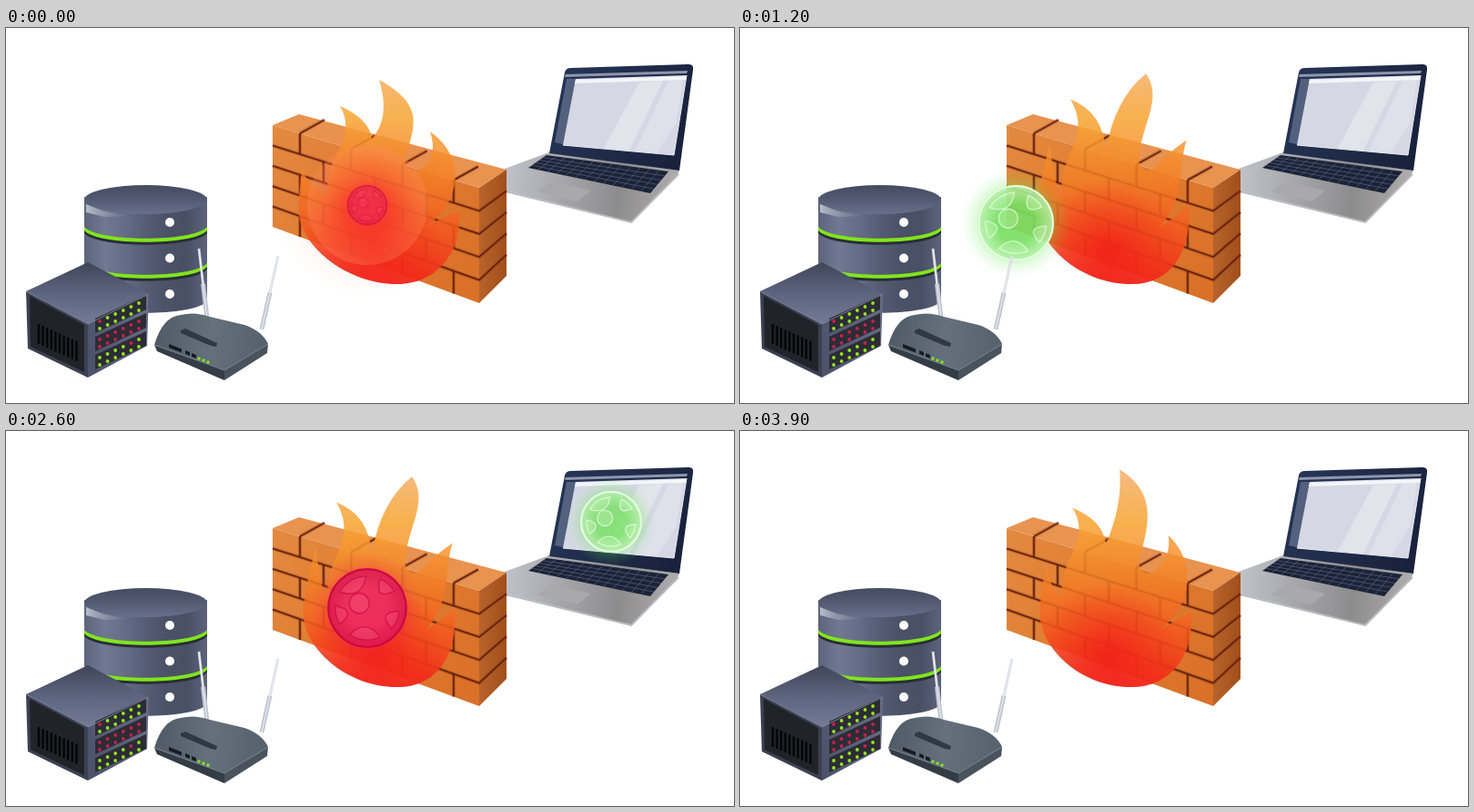
Animation of 800x413 px, one loop 4 s. Source, as an HTML page with a canvas:

```html
<!DOCTYPE html>
<html lang="en">
<head>
<meta charset="utf-8">
<title>Firewall</title>
<style>
html, body { margin: 0; width: 100%; height: 100%; overflow: hidden; background: #fff; }
canvas { display: block; width: 800px; height: 413px; }
</style>
</head>
<body>
<canvas id="stage" width="800" height="413"></canvas>
<script>
const ctx = document.getElementById('stage').getContext('2d');
const LOOP = 4000, STEP = 100, TAU = Math.PI * 2;
const mix = (a, b, k) => a + (b - a) * k;
const ramp = (t, from, to) => Math.max(0, Math.min(1, (t - from) / (to - from)));

function poly(fill, ...pts) {
  ctx.beginPath();
  for (let i = 0; i < pts.length; i += 2) ctx.lineTo(pts[i], pts[i + 1]);
  ctx.closePath();
  ctx.fillStyle = fill;
  ctx.fill();
}
function line(color, width, ...pts) {
  ctx.beginPath();
  for (let i = 0; i < pts.length; i += 2) ctx.lineTo(pts[i], pts[i + 1]);
  ctx.strokeStyle = color;
  ctx.lineWidth = width;
  ctx.stroke();
}
function disc(fill, x, y, r) {
  ctx.beginPath();
  ctx.arc(x, y, r, 0, TAU);
  ctx.fillStyle = fill;
  ctx.fill();
}
function withStops(gradient, colors) {
  colors.forEach((c, i) => gradient.addColorStop(i / (colors.length - 1), c));
  return gradient;
}
const linear = (x0, y0, x1, y1, ...colors) => withStops(ctx.createLinearGradient(x0, y0, x1, y1), colors);
const radial = (x, y, r0, r1, ...colors) => withStops(ctx.createRadialGradient(x, y, r0, x, y, r1), colors);

function seeded(seed) {
  return () => (seed = (seed * 16807) % 2147483647) / 2147483647;
}

function drawLaptop() {
  poly(linear(550, 165, 735, 185, '#c0c1c7', '#a6a6aa', '#8d8c8d', '#aeacad'),
    597, 137, 740, 157, 737, 163, 688, 214, 545, 178, 545, 156);
  line('#b9bac0', 2, 545, 179, 687, 214, 739, 161);
  poly('#a9a8ad', 600, 169, 643, 179, 628, 191, 584, 180);

  // Keyboard: a dark sheet split by a perspective grid.
  const key = (u, v) => [mix(594, 728, u) - 20 * v, mix(140, 158, u) + mix(14, 24, u) * v];
  poly('#1b2338', ...key(0, 0), ...key(1, 0), ...key(1, 1), ...key(0, 1));
  for (let i = 1; i < 5; i++) line('#59617a', .7, ...key(0, i / 5), ...key(1, i / 5));
  for (let i = 1; i < 13; i++) line('#59617a', .7, ...key(i / 13, 0), ...key(i / 13, 1));

  ctx.beginPath();
  ctx.moveTo(597, 138);
  ctx.lineTo(614, 49);
  ctx.quadraticCurveTo(615, 44, 621, 44);
  ctx.lineTo(749, 40);
  ctx.quadraticCurveTo(756, 39, 755, 46);
  ctx.lineTo(740, 157);
  ctx.closePath();
  ctx.fillStyle = linear(600, 60, 750, 140, '#263557', '#18213a');
  ctx.fill();
  poly('#8e97af', 615, 51, 749, 47, 748, 50, 614, 54);
  poly('#53617f', 616, 56, 627, 56, 616, 129, 603, 126);
  poly('#d5d8e4', 626, 56, 748, 52, 734, 140, 612, 129);
  poly('#f4f5f9', 626, 57, 748, 53, 747, 57, 625, 61);
  poly('rgba(255,255,255,.3)', 696, 60, 722, 58, 685, 135, 657, 132);
  poly('rgba(255,255,255,.2)', 728, 58, 744, 57, 737, 104, 715, 138, 691, 136);
  line('#e8ebf2', 1, 612, 129, 734, 140, 748, 52);
}

function drawWall() {
  const rows = 5, pitch = 56.3;
  const frontY = (x, k) => mix(mix(107, 176, (x - 293) / 227), mix(219, 303, (x - 293) / 227), k);
  poly(linear(293, 110, 520, 300, '#e38a40', '#df7b31', '#d97027'), 293, 107, 520, 176, 520, 303, 293, 219);
  poly('#e89350', 293, 107, 322, 95, 550, 156, 520, 176);
  poly(linear(520, 230, 550, 230, '#b8632a', '#a04f1b'), 520, 176, 550, 156, 550, 273, 520, 303);
  for (const [width, color] of [[4, 'rgba(143,57,20,.4)'], [1.6, '#61210f']]) {
    for (let row = 0; row < rows; row++) {
      const top = row / rows, bottom = (row + 1) / rows;
      if (row) line(color, width, 293, frontY(293, top), 520, frontY(520, top), 550, mix(156, 273, top));
      for (let x = row % 2 ? 349 : 323; x < 510; x += pitch) {
        line(color, width, x, frontY(x, top), x, frontY(x, bottom));
        if (!row) line(color, width, x, frontY(x, 0), x + 27, frontY(x, 0) - 15);
      }
    }
  }
}

function drawFlame(t) {
  const phase = t / 700 * TAU;
  const sin = Math.sin(phase), cos = Math.cos(phase), sway = sin * sin;
  const left = 326 - 4 * cos, bottom = 282;
  const low = { x: 331 - 5 * cos + 9 * sway, y: 153 - 26 * sway };
  const side = { x: 367 + 4 * sin, y: 86 - 8 * sway };
  const main = { x: 410 + 38 * sway, y: 50 + 7 * (cos + sin) + 9 * sway };
  const right = { x: 466 + 26 * sway, y: 114 + 14 * sway + 4 * sin };
  const ear = { x: 498 + 5 * sin, y: 202 + 6 * sin };

  ctx.beginPath();
  ctx.moveTo(left, 206);
  ctx.quadraticCurveTo(left - 1, 180, low.x, low.y);
  ctx.quadraticCurveTo(low.x + 5, 179, 354, 184);
  ctx.bezierCurveTo(349, 140, 388, 122, side.x, side.y);
  ctx.quadraticCurveTo(399, side.y + 14, 402, 122 + 14 * sway);
  ctx.quadraticCurveTo(423 - 12 * sway, main.y + 42 - 15 * sway, main.x, main.y);
  ctx.bezierCurveTo(main.x + 50 - 32 * sway, main.y + 28, 450 - 10 * sway, 106, 438, 146);
  ctx.quadraticCurveTo(442, 161, 453, 156);
  ctx.quadraticCurveTo(476 - 10 * sway, right.y + 30 - 14 * sway, right.x, right.y);
  ctx.bezierCurveTo(505 - 25 * sway, right.y + 28, 503 - 14 * sway, 188, 461, 220);
  ctx.quadraticCurveTo(476, 209, ear.x, ear.y);
  ctx.bezierCurveTo(ear.x + 4, 246, 474, bottom, 430, bottom);
  ctx.bezierCurveTo(376, bottom, left + 4, 242, left, 206);
  ctx.fillStyle = linear(0, 40, 0, 283, 'rgba(245,184,125,.95)', 'rgba(247,166,54,.88)',
    'rgba(244,130,38,.8)', 'rgba(243,88,30,.84)', 'rgba(240,40,26,.94)');
  ctx.fill();
  ctx.save();
  ctx.clip();
  disc(radial(405, 247, 0, 80, 'rgba(242,22,24,.75)', 'rgba(245,25,20,0)'), 405, 247, 80);
  ctx.restore();
}

const GREEN = { body: '122,222,100', rim: '190,243,178', edge: '235,255,230', glow: '95,235,75', patch: '218,255,208' };
const RED = { body: '236,44,98', rim: '216,22,80', edge: '205,5,66', glow: '246,32,82', patch: '255,120,155' };

function drawOrb(x, y, r, tone, alpha, density) {
  if (r < 1 || alpha <= 0) return;
  const rgba = (part, a) => `rgba(${tone[part]},${a})`;
  ctx.save();
  ctx.globalAlpha = alpha;
  disc(radial(x, y, r * .82, r * 1.42, rgba('glow', .42), rgba('glow', .15), rgba('glow', 0)), x, y, r * 1.42);
  disc(radial(x, y, 0, r, rgba('body', density), rgba('body', density), rgba('rim', density)), x, y, r);
  ctx.translate(x, y);
  ctx.scale(r, r);
  ctx.strokeStyle = rgba('edge', .9);
  ctx.lineWidth = 2 / r;
  ctx.beginPath();
  ctx.arc(0, 0, .97, 0, TAU);
  ctx.stroke();

  // Crescent patches around a small off-centre ring.
  ctx.strokeStyle = rgba('edge', .65);
  ctx.fillStyle = rgba('patch', .22);
  ctx.lineWidth = 1.4 / r;
  for (let i = 0; i < 5; i++) {
    const mid = .4 + i * TAU / 5, half = .3 + .2 * (i % 2);
    ctx.beginPath();
    ctx.arc(0, 0, .8, mid - half, mid + half);
    ctx.quadraticCurveTo(.25 * Math.cos(mid), .25 * Math.sin(mid), .8 * Math.cos(mid - half), .8 * Math.sin(mid - half));
    ctx.fill();
    ctx.stroke();
  }
  ctx.beginPath();
  ctx.arc(-.2, -.12, .25, 0, TAU);
  ctx.fill();
  ctx.stroke();
  ctx.restore();
}

function drawGreen(t, behindWall) {
  if (t < 600) return;
  const toWall = ramp(t, 600, 1600), toLaptop = ramp(t, 1600, 2600), fade = 1 - ramp(t, 2600, 2900);
  drawOrb(155 + 247 * toWall + 263 * toLaptop, 258 - 72 * toWall - 86 * toLaptop,
    (42 - 8 * toLaptop) * mix(.4, 1, fade), GREEN, fade, behindWall ? .65 : .85);
}

function drawRed(t) {
  const time = t < 600 ? t + 3300 : t;
  if (time < 1500 || time > 3500) return;
  const travel = ramp(time, 1500, 2600), spread = ramp(time, 2600, 3300), fade = 1 - ramp(time, 3300, 3500);
  const x = 158 + 239 * travel, y = 257 - 62 * travel;
  if (spread) {
    const size = mix(46, 66, Math.sqrt(spread)), halo = size + 35;
    disc(radial(x, y, 0, size, `rgba(255,20,50,${.65 * fade})`, `rgba(255,65,55,${.42 * fade})`,
      `rgba(255,150,100,${.28 * fade})`), x, y, size);
    disc(radial(x, y, size, halo, `rgba(255,70,50,${.06 * fade})`, 'rgba(255,70,50,0)'), x, y, halo);
  }
  drawOrb(x, y, (48 - 4 * travel) * (1 - ramp(time, 3100, 3500)), RED, 1 - ramp(time, 3100, 3500), .85);
}

function drawDatabase() {
  const shade = linear(86, 0, 221, 0, '#5d647c', '#717992', '#656d86', '#555c74', '#4b5167', '#494f65', '#5c637b');
  const tier = (top, bottom, fill) => {
    ctx.beginPath();
    ctx.moveTo(86, top);
    ctx.lineTo(86, bottom);
    ctx.bezierCurveTo(100, bottom + 17, 207, bottom + 17, 221, bottom);
    ctx.lineTo(221, top);
    ctx.bezierCurveTo(207, top + 15, 100, top + 15, 86, top);
    ctx.fillStyle = fill;
    ctx.fill();
  };
  for (let i = 2; i >= 0; i--) {
    const top = 186 + i * 40, bottom = top + 33;
    if (i < 2) {
      tier(top, bottom + 7, '#292d38');
      tier(top, bottom + 4, '#80e51c');
    }
    tier(top, bottom + (i === 2 ? 2 : 0), shade);
    disc('#fff', 180, top + 28 - i / 2, 5);
  }
  ctx.beginPath();
  ctx.ellipse(153.5, 189, 67.5, 16, 0, 0, TAU);
  ctx.fillStyle = linear(0, 173, 0, 205, '#454b60', '#535a72', '#69718a');
  ctx.fill();
  poly(linear(88, 0, 135, 0, '#b8bdca', 'rgba(120,128,150,.2)'), 88, 194, 108, 202, 135, 207, 108, 208, 88, 203);
}

function drawServer() {
  poly(linear(0, 258, 0, 326, '#3f4559', '#5d647d', '#747b94'), 22, 290, 90, 258, 157, 293, 90, 326);
  poly('#3b4052', 22, 290, 90, 326, 90, 385, 24, 353);
  poly('#222329', 26, 295, 86, 327, 86, 379, 27, 351);
  for (let x = 36; x < 79; x += 4.6) {
    const y = 326 + (x - 36) * .45;
    line('#050506', 2.4, x, y, x, y + 22);
  }
  poly(linear(90, 350, 157, 325, '#4d536b', '#656c85'), 90, 326, 157, 293, 155, 350, 90, 385);
  const random = seeded(41);
  for (let panel = 0; panel < 3; panel++) {
    const y = 320 + panel * 20, redShare = panel === 1 ? .8 : .12;
    poly('#2d2c35', 98, y, 154, y - 26, 154, y - 10, 98, y + 16);
    for (let i = 0; i < 12; i++) {
      const column = i % 6, row = Math.floor(i / 6);
      disc(random() < redShare ? '#c8204a' : '#91e51f', 103 + column * 8.6, y + 3 + row * 8 - column * 4, 1.9);
    }
  }
  line('#777e96', 1, 22, 290, 90, 326, 157, 293);
}

function drawRouter() {
  const antenna = (x0, y0, x1, y1) => {
    const mx = mix(x0, x1, .5), my = mix(y0, y1, .5);
    line('#c3c7d2', 5, x0, y0, mx, my);
    line('#d6d8e0', 2.8, mx, my, x1, y1);
    line('#eef0f5', 1, x0, y0, x1, y1);
  };
  antenna(221, 320, 212, 243);
  antenna(281, 332, 299, 251);
  poly('#343c45', 163, 349, 240, 376, 240, 388, 166, 356);
  poly('#48535d', 240, 376, 288, 348, 287, 358, 240, 388);
  ctx.beginPath();
  ctx.moveTo(163, 349);
  ctx.quadraticCurveTo(172, 318, 192, 316);
  ctx.quadraticCurveTo(207, 312, 224, 318);
  ctx.lineTo(262, 327);
  ctx.quadraticCurveTo(282, 334, 288, 348);
  ctx.lineTo(240, 377);
  ctx.closePath();
  ctx.fillStyle = linear(165, 340, 285, 350, '#4f5b66', '#64717c', '#55616c');
  ctx.fill();
  line('#808b94', .8, 163, 349, 240, 377, 288, 348);
  poly('#303841', 192, 333, 197, 331, 232, 347, 231, 351, 225, 350, 192, 336);
  const port = (x, y, w) => poly('#171b20', x, y, x + w, y + w * .4, x + w, y + w * .4 + 4, x, y + 4);
  port(179, 348, 14);
  port(197, 355, 5);
  port(204, 358, 5);
  for (let i = 0; i < 3; i++) disc('#83e424', 212 + i * 5, 364 + i * 2, 1.8);
}

function frame(now) {
  const t = Math.floor(now % LOOP / STEP) * STEP;
  const behindWall = t > 1850;
  ctx.fillStyle = '#fff';
  ctx.fillRect(0, 0, 800, 413);
  drawLaptop();
  if (behindWall) drawGreen(t, true);
  drawWall();
  drawFlame(t);
  if (!behindWall) drawGreen(t, false);
  drawRed(t);
  drawDatabase();
  drawServer();
  drawRouter();
}

const start = performance.now();
function play() {
  frame(performance.now() - start);
  requestAnimationFrame(play);
}
play();
</script>
</body>
</html>
```
